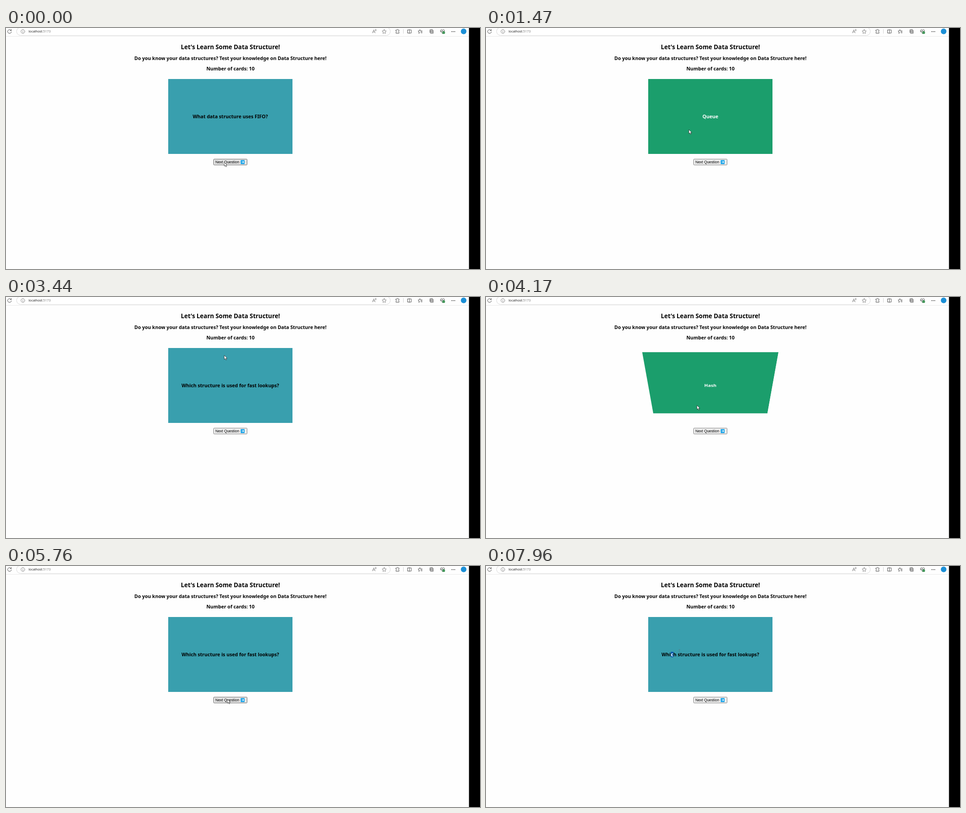
An HTML page that plays this animation: 1049x534 px, repeating every 8000 ms.

```html
<!DOCTYPE html>
<html lang="en">
<head>
<meta charset="utf-8">
<title>Data structure flashcards</title>
<style>
  html, body { margin: 0; width: 100%; height: 100%; overflow: hidden; background: #fefefe; }
  svg { position: absolute; left: 0; top: 0; }
  .heading, .face { font: 700 10.63px "Noto Sans", "Open Sans", sans-serif; }
  .heading { text-anchor: middle; }
  .heading .title { font-size: 13.4px; }
  .address { font: 7.2px "Noto Sans", "Open Sans", sans-serif; }
  .icon { fill: none; stroke: #3c3c3c; stroke-width: .9; stroke-linecap: round; stroke-linejoin: round; }
  .pale { stroke: #777; }
  #scene { position: absolute; left: 359px; top: 113px; width: 275px; height: 166px; perspective: 550px; }
  #card { width: 100%; height: 100%; transform-style: preserve-3d; }
  .face { position: absolute; inset: 0; display: flex; align-items: center; justify-content: center;
    box-sizing: border-box; padding-bottom: 1px; white-space: pre; backface-visibility: hidden; }
  #front { background: #399fae; color: #000; }
  #back { background: #1b9e6c; color: #fff; transform: rotateX(180deg); }
  .selected { color: #fff; background: linear-gradient(#0b5cb0, #0b5cb0) center / 100% 12px no-repeat; }
  #button { fill: #efefef; stroke: #808080; }
  #button.hover { fill: #e5e5e5; stroke: #686868; }
  .label { font: 8.36px "Liberation Sans", Arial, sans-serif; }
</style>
</head>
<body>
<svg width="1049" height="534" viewBox="0 0 1049 534">
  <path d="M0 18.5H1025" stroke="#e9e9e9"/>
  <rect x="23.5" y="-1.5" width="827" height="18" rx="9" fill="#fff" stroke="#d8d8d8"/>
  <g class="icon">
    <path d="M11.2 5.2A4.2 4.2 0 1 0 12 8.6M11.8 3.2V5.8H9.2"/>
    <g class="pale">
      <circle cx="37.4" cy="7.7" r="4.2"/>
      <path d="M37.4 7.4V9.8M37.4 5.6V5.7"/>
      <path d="M811 11L814 4L817 11M812 8.8H816M817.3 3.4Q818.2 4.6 817.3 5.8M818.6 2.6Q820 4.6 818.6 6.6"/>
      <path d="M837 3.2L838.4 6.2L841.6 6.6L839.3 8.9L839.8 12.1L837 10.6L834.2 12.1L834.7 8.9L832.4 6.6L835.6 6.2Z"/>
    </g>
    <path d="M863 4.6H865.2A1.5 1.5 0 0 1 868.2 4.6H869.8V6.5A1.5 1.5 0 0 0 869.8 9.4V11.6H863V9.4A1.5 1.5 0 0 0 863 6.5Z"/>
    <path d="M879.5 3V12" stroke="#ccc"/>
    <path d="M891.6 4.2H888.6V11.2H891.6M893.8 4.2H896.8V11.2H893.8M892.7 3V12.4"/>
    <path d="M916 10.4L913.4 11.8L914 8.8L912 6.8L914.8 6.4L916 3.6L917.3 6.4H921M918 8.6H921M918.6 10.8H921"/>
    <path d="M938.2 10V4.4Q938.2 3.4 939.2 3.4H943.4Q944.4 3.4 944.4 4.4M940 5.6H945.4V11.8H940ZM942.7 7.2V10.2M941.2 8.7H944.2"/>
    <path d="M966 12L962 8Q960.7 6 962.2 4.4Q964.2 2.8 966 5Q967.8 2.8 969.8 4.4Q971.2 6 970 8ZM962 7.6H964.4L965.4 6L966.8 9L967.6 7.6"/>
  </g>
  <circle cx="968.6" cy="10.2" r="2.9" fill="#20833b"/>
  <path d="M967.2 10.2L968.3 11.3L970 9.2" fill="none" stroke="#fff" stroke-width=".7"/>
  <path d="M986.7 8H994" stroke="#333" stroke-width="1.8" stroke-linecap="round" stroke-dasharray="0 3.2"/>
  <circle cx="1012.8" cy="7.5" r="6.2" fill="#1b8fd6"/>
  <text class="address" x="50" y="10.3" fill="#222">localhost<tspan fill="#777">:5173</tspan></text>

  <g class="heading">
    <text class="title" x="496.7" y="47.2">Let's Learn Some Data Structure!</text>
    <text x="496.7" y="71.2">Do you know your data structures? Test your knowledge on Data Structure here!</text>
    <text x="496.7" y="94.3">Number of cards: 10</text>
  </g>

  <rect id="button" x="459.5" y="290.5" width="74" height="13" rx="1"/>
  <text class="label" x="463.2" y="300.2">Next Question</text>
  <rect x="519.3" y="292.7" width="8.7" height="8.7" rx="1" fill="#109fe6"/>
  <path d="M521 297H526M524.2 295L526.2 297L524.2 299" fill="none" stroke="#fff" stroke-width="1.2"/>
  <rect x="1024.6" width="25" height="534"/>
</svg>

<div id="scene"><div id="card"><div id="front" class="face"></div><div id="back" class="face"></div></div></div>

<svg width="1049" height="534" viewBox="0 0 1049 534">
  <path id="arrow" d="M0 0V9.2L2.1 7.3L3.6 10.6L5.1 9.9L3.7 6.8H6.4Z" fill="#fff" stroke="#222" stroke-width=".75"/>
  <path id="beam" d="M-1.6 -4H1.6M0 -4V4M-1.6 4H1.6" fill="none" stroke="#5f6b70" stroke-width=".5"/>
</svg>

<script>
const LOOP = 8000, FLIP = 250;
const STEP = 134, FIRST_STEP = 120; // the screen refreshes in steps
const byId = id => document.getElementById(id);
const [card, front, back, button, arrow, beam] =
  ["card", "front", "back", "button", "arrow", "beam"].map(byId);

const cards = [
  { from: 0, reveal: 840, hide: 2000, question: "What data structure uses FIFO?", answer: "Queue" },
  { from: 3140, reveal: 4010, hide: 5080, question: "Which structure is used for fast lookups?", answer: "Hash" }
];

// Places where the pointer turns or rests
const stops = [
  { at: 0, x: 483, y: 297 },
  { at: 520, x: 201, y: 215 },
  { at: 1120, x: 410, y: 56 },
  { at: 1460, x: 449, y: 225 },
  { at: 2260, x: 464, y: 200 },
  { at: 2660, x: 488, y: 314 },
  { at: 2840, x: 486, y: 294 },
  { at: 3330, x: 483, y: 129 },
  { at: 4270, x: 466, y: 246 },
  { at: 4930, x: 466, y: 246 },
  { at: 5740, x: 490, y: 295 },
  { at: 6500, x: 530, y: 240 },
  { at: 6900, x: 430, y: 188 },
  { at: 7210, x: 490, y: 210 },
  { at: 7890, x: 428, y: 189 }
];

const clamp = v => Math.min(1, Math.max(0, v));
const smooth = p => p * p * (3 - 2 * p);
const easeOut = p => 1 - (1 - p) ** 2.2;
const flipped = (t, start) => easeOut(clamp((t - start) / FLIP));

function pointerAt(t) {
  const i = stops.findLastIndex(s => s.at <= t);
  const a = stops[i], b = stops[i + 1] || a;
  const p = a === b ? 0 : smooth((t - a.at) / (b.at - a.at));
  return { x: a.x + (b.x - a.x) * p, y: a.y + (b.y - a.y) * p };
}

function draw(t) {
  const { reveal, hide, question, answer } = cards.findLast(c => c.from <= t);
  const selecting = t > 7800;
  front.innerHTML = `<span>${selecting ? question.replace("c", '<span class="selected">c</span>') : question}</span>`;
  back.textContent = answer;
  const angle = 180 * (flipped(t, reveal) - flipped(t, hide));
  card.style.transform = angle ? `rotateX(${angle}deg)` : "none";

  const { x, y } = pointerAt(t);
  button.classList.toggle("hover", x > 459 && x < 534 && y > 290 && y < 304);
  const overText = t > 6400 && y < 204;
  arrow.style.display = overText ? "none" : "";
  beam.style.display = overText ? "" : "none";
  (overText ? beam : arrow).setAttribute("transform", `translate(${x} ${y})`);
}

const begin = performance.now();
function frame() {
  const t = (performance.now() - begin) % LOOP;
  draw(Math.max(0, FIRST_STEP + STEP * Math.floor((t - FIRST_STEP) / STEP)));
  requestAnimationFrame(frame);
}
frame();
</script>
</body>
</html>
```
